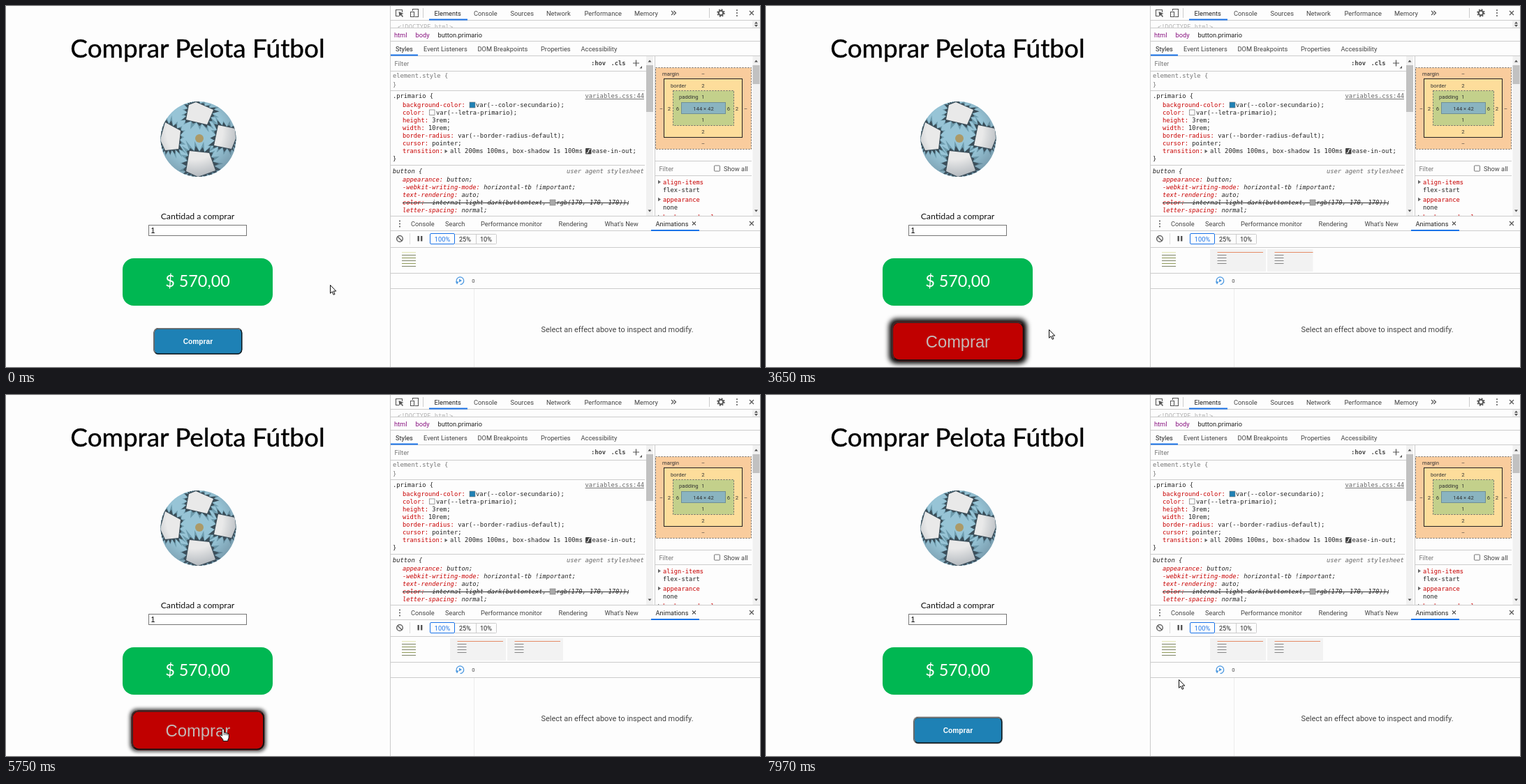
These frames come from a looping animation (1080 px wide and 518 px high, 8000 ms). An HTML page:

```html
<!DOCTYPE html>
<html lang="es">
<head>
<meta charset="utf-8">
<title>Comprar Pelota Fútbol</title>
<style>
html, body { margin: 0; width: 100%; height: 100%; overflow: hidden; background: #fdfdfd; }
svg { display: block; width: 1080px; height: 518px; }
text { white-space: pre; font: 9.25px Roboto, "Open Sans", sans-serif; fill: #444; }
.page { font-family: Lato, sans-serif; text-anchor: middle; stroke-linejoin: round; }
.code { font: 8.78px "DejaVu Sans Mono", monospace; fill: #222; }
.it { font-style: italic; }
.red { fill: #c80000; }
.box { font-size: 7.7px; fill: #333; }
.mid { text-anchor: middle; }
</style>
</head>
<body>
<svg viewBox="0 0 1080 518">
  <defs>
    <clipPath id="ballClip"><circle cx="275.5" cy="191" r="54"/></clipPath>
    <radialGradient id="shade" cx=".45" cy=".4" r=".62">
      <stop offset=".6" stop-color="#456" stop-opacity="0"/>
      <stop offset="1" stop-color="#456" stop-opacity=".35"/>
    </radialGradient>
    <clipPath id="domClip"><rect x="551" y="21" width="517" height="10"/></clipPath>
    <clipPath id="sideClip"><rect x="930" y="244" width="138" height="57"/></clipPath>
    <clipPath id="clip1"><rect id="wipe1" x="636" y="348" height="35"/></clipPath>
    <clipPath id="clip2"><rect id="wipe2" x="718" y="348" height="35"/></clipPath>
    <filter id="blur" filterUnits="userSpaceOnUse" x="-100" y="-60" width="200" height="120">
      <feGaussianBlur id="blurSize" stdDeviation="0"/>
    </filter>
  </defs>
  <g id="page"></g>
  <g id="tools"></g>
  <g id="thumbs"></g>
  <g id="button">
    <rect id="shadow" rx="7" filter="url(#blur)"/>
    <rect id="face" x="-63.5" y="-19" width="127" height="38" rx="7"/>
    <rect x="-62.8" y="-18.3" width="125.6" height="36.6" rx="6.3" fill="none" stroke="#141414" stroke-width="1.4"/>
    <path id="bevel" d="M-61 16.5Q-62.8 14.7 -62.8 12V-12Q-62.8 -18.3 -56.5 -18.3H56.5Q59.2 -18.3 61 -16.5" fill="none" stroke-width="1.4"/>
    <text id="label" class="mid">Comprar</text>
  </g>
  <path id="arrow" d="M.5 .5V12.3L3.2 9.8L5.1 14.3L7 13.5L5.1 9.1H8.8Z" fill="#fff" stroke="#111" stroke-width="1"/>
  <g id="hand">
    <path d="M-1.6 10.2V1.4Q-1.6 0 -.2 0T1.3 1.4V5.4Q3.1 4.6 3.9 6Q5.4 5.3 6.1 6.7Q8.2 6.3 8.2 8.6V12Q8.2 14 6.9 15.5V17.5H-.1V15.6L-4.2 10.4Q-5 8.6 -3.4 8.3Z" fill="#fff" stroke="#111" stroke-width="1" stroke-linejoin="round"/>
    <path d="M1.3 5.4V9M3.9 6V9.2M6.1 6.7V9.4" stroke="#111" stroke-width=".8"/>
  </g>
</svg>
<script>
const $ = id => document.getElementById(id);
const set = (el, attrs) => { for (const k in attrs) el.setAttribute(k, attrs[k]); };
const clamp = v => Math.min(1, Math.max(0, v));
const mix = (a, b, p) => a + (b - a) * p;
const rgb = (a, b, p) => `rgb(${a.map((v, i) => Math.round(mix(v, b[i], p)))})`;

const esc = s => s.replace(/</g, '&lt;');
const text = (x, y, s, cls = '', style = '') => `<text x="${x}" y="${y}" class="${cls}" style="${style}">${esc(s)}</text>`;
const rect = (x, y, w, h, fill, more = '') => `<rect x="${x}" y="${y}" width="${w}" height="${h}" fill="${fill}" ${more}/>`;
const path = (d, color, w = 1, more = '') => `<path d="${d}" fill="none" stroke="${color}" stroke-width="${w}" ${more}/>`;
const shape = (d, fill) => `<path d="${d}" fill="${fill}"/>`;
const hline = (x, y, x2, color = '#ccc') => path(`M${x} ${y}H${x2}`, color);

function ball() {
  let seed = 7;
  const rnd = () => (seed = seed * 16807 % 2147483647) / 2147483647;
  const patches = [
    [[262, 142], [272, 138], [297, 149], [288, 170], [258, 163]],
    [[304, 171], [328, 176], [329, 190], [323, 205], [298, 200]],
    [[228, 167], [250, 179], [247, 205], [228, 207], [221, 192]],
    [[263, 208], [291, 211], [300, 236], [275, 245], [258, 237]]
  ];
  const center = (p, k) => p.reduce((s, q) => s + q[k], 0) / 5;
  function spiky(p, reach, fill) {
    const cx = center(p, 0), cy = center(p, 1), pts = [];
    for (let i = 0; i < 40; i++) {
      const a = p[i / 8 | 0], b = p[((i / 8 | 0) + 1) % 5], u = i % 8 / 8;
      const k = 1.04 + (i % 2) * reach * (.4 + .6 * rnd());
      pts.push([cx + (mix(a[0], b[0], u) - cx) * k, cy + (mix(a[1], b[1], u) - cy) * k]);
    }
    return shape('M' + pts.join('L') + 'Z', fill);
  }
  const each = f => patches.map(f).join('');
  return `<g clip-path="url(#ballClip)">${rect(221, 136, 109, 110, '#97c4d6')}
    ${each(p => spiky(p, .85, '#6d9bad'))}${each(p => spiky(p, .45, '#3b4e59'))}
    ${each(p => shape(`M${p.join('L')}Z`, '#e9e9e9'))}
    <circle cx="277" cy="190" r="6" fill="#ab9a68"/>
    <circle cx="275.5" cy="191" r="54" fill="url(#shade)"/></g>`;
}

$('page').innerHTML =
  text(274.5, 74, 'Comprar Pelota Fútbol', 'page', 'font-size:36.9px;fill:#000;stroke:#000;stroke-width:.4') +
  ball() +
  text(274.5, 306, 'Cantidad a comprar', 'page', 'font-size:12.3px;fill:#111') +
  rect(204.5, 314.5, 140, 15, '#fff', 'stroke="#767676"') +
  text(207.5, 326, '1', '', 'font:10.67px Liberation Sans,sans-serif;fill:#000') +
  rect(167, 362, 215, 68, '#00b752', 'rx="16"') +
  text(274.5, 403, '$ 570,00', 'page', 'font-size:23.4px;fill:#fff');

function scrollbar(x, thumbY, thumbH) {
  return rect(x, 72, 10, 229, '#f1f1f1') + rect(x, thumbY, 10, thumbH, '#c1c1c1') +
    shape(`M${x + 2.5} 80.5h5l-2.5 -3z`, '#505050') + shape(`M${x + 2.5} 292.5h5l-2.5 3z`, '#505050');
}
const cross = (x, y) => path(`M${x - 3} ${y - 3}l6 6m0 -6l-6 6`, '#555', 1.2);
const dots = (x, y) => [-4, 0, 4].map(d => `<circle cx="${x}" cy="${y + d}" r="1" fill="#555"/>`).join('');
const fold = (x, y) => shape(`M${x} ${y - 2.7}v5.4l4 -2.7z`, '#666');
const row = (y, items) => items.map(([x, s, color]) => text(x, y, s, '', color ? 'fill:' + color : '')).join('');
const rule = (y, name, value, x, cls = '') => text(568, y, name + ':', 'code red ' + cls) + text(x || 568 + 5.28 * (name.length + 2), y, value, 'code ' + cls);

function topBars() {
  return rect(550, 0, 530, 518, '#fdfdfd') +
    hline(551, 20.5, 1080) + hline(551, 31.5, 1080) + hline(551, 50.5, 1080) + hline(551, 71.5, 1080) +
    path('M563 14.5h-4.5v-9h9v3.5', '#555', 1.1) + shape('M562.5 8l7 3l-3 1l2.5 3l-1.2 1l-2.4 -3l-1.9 2z', '#555') +
    path('M582.5 7V4.5h8v11h-5M579.5 8.5h5v7h-5z', '#555', 1.1) + path('M597.5 3V17M1007.5 3V17', '#ccc') +
    row(13.5, [[613.5, 'Elements', '#222'], [670, 'Console'], [722.5, 'Sources'], [774, 'Network'], [828.5, 'Performance'], [900, 'Memory']]) +
    path('M953 7l3 3l-3 3m3.5 -6l3 3l-3 3', '#555', 1.2) + rect(606, 18.5, 55, 2, '#1a73e8') +
    `<circle cx="1024" cy="10" r="3.2" fill="none" stroke="#555" stroke-width="2"/>
     <circle cx="1024" cy="10" r="4.9" fill="none" stroke="#555" stroke-width="1.6" stroke-dasharray="2 1.85"/>` +
    dots(1047, 10) + cross(1068, 10) +
    `<g clip-path="url(#domClip)">${text(561, 32.5, '<!DOCTYPE html>', 'code', 'fill:#b4b4b4')}</g>` +
    rect(1069, 21, 11, 10, '#f1f1f1') + shape('M1072 25.5h5l-2.5 -3zM1072 27h5l-2.5 3z', '#505050') +
    row(44.5, [[556, 'html', '#881280'], [586.5, 'body', '#881280'], [618.5, 'button.primario', '#222']]) +
    row(64.5, [[558, 'Styles', '#222'], [598, 'Event Listeners'], [675.5, 'DOM Breakpoints'], [766, 'Properties'], [823.5, 'Accessibility']]) +
    rect(551, 69.5, 39, 2, '#1a73e8');
}

function styles() {
  return text(556.5, 86, 'Filter', '', 'fill:#777') +
    text(838, 85, ':hov', 'code', 'font-weight:bold;fill:#444') + text(866.5, 85, '.cls', 'code', 'font-weight:bold;fill:#444') +
    path('M898 82h9m-4.5 -4.5v9', '#555', 1.2) + shape('M911 86v3.5h-3.5z', '#555') +
    hline(551, 93.5, 917) + hline(551, 121.5, 915) + hline(551, 228.5, 915) +
    text(554, 103, 'element.style {', 'code', 'fill:#777') + text(554, 116, '}', 'code', 'fill:#777') +
    text(554, 132, '.primario {', 'code') + text(829.5, 132, 'variables.css:44', 'code', 'fill:#666;text-decoration:underline') +
    rule(145, 'background-color', 'var(--color-secundario);', 673) + rect(664, 138, 8, 8, '#1f81b5', 'stroke="#777" stroke-width=".6"') +
    rule(156, 'color', 'var(--letra-primario);', 616) + rect(606.5, 149, 7.5, 7.5, '#fff', 'stroke="#777" stroke-width=".7"') +
    rule(167, 'height', '3rem;') + rule(178, 'width', '10rem;') +
    rule(189, 'border-radius', 'var(--border-radius-default);') + rule(200, 'cursor', 'pointer;') +
    rule(211, 'transition', 'all 200ms 100ms, box-shadow 1s 100ms', 636) + fold(628.5, 208.5) +
    rect(830, 204, 8.5, 8.5, '#444', 'rx="1"') + path('M831.5 211q3 -.5 3 -3t3 -3', '#fff', 1.1) + text(839.5, 211, 'ease-in-out;', 'code') +
    text(554, 222, '}', 'code') + text(554, 240, 'button {', 'code it') +
    text(803, 240, 'user agent stylesheet', 'code it', 'fill:#666') +
    rule(252, 'appearance', 'button;', 0, 'it') + rule(263, '-webkit-writing-mode', 'horizontal-tb !important;', 0, 'it') +
    rule(274, 'text-rendering', 'auto;', 0, 'it') +
    rule(285, 'color', '-internal-light-dark(buttontext, ', 0, 'it') + text(788.5, 285, 'rgb(170, 170, 170));', 'code it') +
    hline(568, 282.5, 892, '#333') + rect(779, 278, 8, 8, '#aaa', 'stroke="#777" stroke-width=".6"') +
    rule(296, 'letter-spacing', 'normal;', 0, 'it') + scrollbar(917, 85, 67);
}

function boxModel() {
  const dash = 'stroke="#666" stroke-dasharray="2 2"', solid = 'stroke="#222"';
  const num = (x, y, s) => text(x, y, s, 'box mid');
  return path('M929.5 72V301', '#ccc') +
    rect(930.5, 88.5, 137, 117, '#f9cc9d', dash) + rect(942.5, 104.5, 112, 84, '#fddd9b', solid) +
    rect(955.5, 121.5, 87, 50, '#c3d08b', dash) + rect(967.5, 138.5, 63, 16, '#8ab4c0', 'stroke="#6f8f96"') +
    text(940, 100, 'margin', 'box') + text(952, 116.5, 'border', 'box') + text(964, 133, 'padding', 'box') +
    num(998.5, 100, '–') + num(998.5, 116.5, '2') + num(998.5, 133, '1') + num(999, 149.5, '144 × 42') +
    num(998.5, 166, '1') + num(998.5, 183, '2') + num(998.5, 200, '–') +
    [[938.5, '–'], [950, '2'], [962, '6'], [1035, '6'], [1047, '2'], [1059.5, '–']].map(([x, s]) => num(x, 149.5, s)).join('') +
    hline(930, 222.5, 1068) + hline(930, 243.5, 1068) + text(935.5, 237, 'Filter', '', 'fill:#777') +
    rect(1014.5, 229, 8, 8, '#fff', 'stroke="#767676" rx="1"') + text(1028, 237, 'Show all') +
    `<g clip-path="url(#sideClip)">` +
    [['align-items', 'flex-start'], ['appearance', 'none'], ['background-color', '']].map(([k, v], i) =>
      fold(934, 252.5 + i * 25) + text(941, 256 + i * 25, k, 'code red') + text(941, 267 + i * 25, v, 'code')).join('') + '</g>' +
    scrollbar(1069.5, 85, 27);
}

function drawer() {
  return [301.5, 322.5, 346.5, 383.5, 405.5].map(y => hline(551, y, 1080)).join('') +
    dots(564, 312.5) +
    row(316, [[580, 'Console'], [629, 'Search'], [680, 'Performance monitor'], [791.5, 'Rendering'], [857.5, "What's New"], [930.5, 'Animations', '#222']]) +
    path('M983 309.5l5 5m0 -5l-5 5', '#555', 1.1) + cross(1068, 312) + rect(924, 321, 69, 2, '#1a73e8') +
    '<circle cx="564" cy="334" r="4.3" fill="none" stroke="#555" stroke-width="1.3"/>' + path('M561 331l6 6', '#555', 1.3) +
    rect(589.5, 330, 2.4, 7.5, '#555') + rect(594, 330, 2.4, 7.5, '#555') +
    path('M578.5 326V342', '#ddd') + rect(642.5, 327.5, 60, 14, '#fdfdfd', 'stroke="#ccc" rx="1"') + path('M673.5 327V342', '#ccc') +
    rect(607.5, 326.5, 35, 15, '#fdfdfd', 'stroke="#1a73e8" rx="1.5"') +
    text(625, 337.5, '100%', 'mid', 'fill:#1a73e8') + text(657.5, 337.5, '25%', 'mid', 'fill:#222') + text(687.5, 337.5, '10%', 'mid', 'fill:#222') +
    path('M646.2 397.5A5.3 5.3 0 1 1 650.5 399.6', '#4a97e0', 1.2) + shape('M649 391.5v5l4 -2.5zM644 395.5l4.5 0l-2.5 4z', '#4a97e0') +
    text(669.5, 396.5, '0', 'mid', 'font-size:7.7px') + path('M670.5 406V518', '#ececec') +
    text(875.5, 467.5, 'Select an effect above to inspect and modify.', 'mid', 'font-size:10.95px') +
    path('M550.5 0V518', '#cbcbcb');
}

$('tools').innerHTML = topBars() + styles() + boxModel() + drawer();

const bars = (x, w, ys, color) => ys.map(y => hline(x, y, x + w, color)).join('');
const shortRows = [357.5, 361.5, 365.5, 369.5];
const thumb = (n, x) => `<g clip-path="url(#clip${n})">${rect(x, 349, 80, 32, '#f2f2f2')}
  <g id="run${n}">${rect(x + 1, 350, 0, 30, '#bad6f6', `id="fill${n}"`)}<path id="edge${n}" stroke="#555"/></g>
  ${bars(x + 10.5, 65.5, [353.5], '#e58c66')}${bars(x + 10.5, 13, shortRows, '#858585')}</g>`;
$('thumbs').innerHTML = bars(567, 20, [353.5], '#e2e6b4') + bars(567, 20, [357.5, 365.5, 373.5], '#7d8468') +
  bars(567, 20, [361.5, 369.5], '#8f9a58') + thumb(1, 636) + thumb(2, 718);

function bezier(x1, y1, x2, y2) {
  const at = (a, b, u) => 3 * a * u * (1 - u) ** 2 + 3 * b * u * u * (1 - u) + u ** 3;
  return x => {
    let lo = 0, hi = 1;
    x = clamp(x);
    for (let i = 0; i < 24; i++) {
      const m = (lo + hi) / 2;
      if (at(x1, x2, m) < x) lo = m; else hi = m;
    }
    return at(y1, y2, hi);
  };
}
const ease = bezier(.25, .1, .25, 1), easeInOut = bezier(.42, 0, .58, 1);

// Screen refreshes: first time, last time, count
const bursts = [[790, 1560, 11], [1640, 1800, 3], [1950, 2410, 7], [3340, 4120, 11], [4200, 4200, 1], [4360, 4360, 1],
  [4810, 5580, 11], [5660, 5970, 5], [6810, 7580, 11], [7660, 7970, 5]];
function refresh(t) {
  let last = 0;
  for (const [a, b, n] of bursts) {
    if (t < a) break;
    const step = n > 1 ? (b - a) / (n - 1) : 1;
    last = Math.min(b, a + Math.floor((t - a) / step + .01) * step);
  }
  return last;
}

const hovers = [1480, 3470, 5040, 7232];   // enter, leave, enter, leave
function hover(t, duration, curve) {
  const n = hovers.filter(h => h <= t).length;
  if (!n) return 0;
  const p = curve((t - hovers[n - 1] - 100) / duration);
  return n % 2 ? p : 1 - p;
}

const track = [[0, 464, 400], [713, 464, 400], [1560, 324, 473], [3263, 324, 473], [3650, 414, 463], [4800, 414, 463],
  [5120, 316, 476], [5580, 311, 478.5], [6733, 311, 478.5], [6950, 318, 477], [7330, 415.5, 460], [7590, 418, 460], [7970, 591, 408], [8000, 591, 408]];
function pointer(t) {
  const i = Math.max(1, track.findIndex(k => k[0] >= t));
  const [a, b] = [track[i - 1], track[i]], u = clamp((t - a[0]) / (b[0] - a[0])), s = u * u * (3 - 2 * u);
  return [mix(a[1], b[1], s), mix(a[2], b[2], s)];
}

function drawButton(t) {
  const p = hover(t, 200, ease), glow = hover(t, 1000, easeInOut), tint = 1 - (1 - p) ** 1.8;
  const grow = 2.5 * glow, size = mix(10.2, 15.9, p);
  set($('button'), { transform: `translate(274.9 481) scale(${1 + p / 2})` });
  set($('shadow'), { x: -63.5 - grow, y: -19 - grow, width: 127 + 2 * grow, height: 38 + 2 * grow, opacity: glow });
  set($('blurSize'), { stdDeviation: 2.6 * glow });
  set($('face'), { fill: rgb([30, 129, 181], [192, 0, 0], tint) });
  set($('bevel'), { stroke: rgb([128, 124, 122], [66, 40, 40], p) });
  set($('label'), { y: size * .36, style: `font:${p < .35 ? 700 : 400} ${size}px Liberation Sans,sans-serif;fill:${rgb([255, 255, 255], [196, 184, 182], p)}` });
}

function drawThumb(n, x, born, replay, t) {
  set($('wipe' + n), { width: t < born ? 0 : 40 + 40 * ease((t - born) / 200) });
  const u = (t - replay) / 200, w = 79 * clamp(u / .9);
  set($('run' + n), { opacity: u < 0 ? 0 : clamp((1 - u) * 10) });
  set($('fill' + n), { width: w });
  set($('edge' + n), { d: `M${x + .5 + w} 350V380` });
}

function draw(time) {
  const t = refresh(time), [x, y] = pointer(t);
  const over = hovers.filter(h => h <= t).length % 2;
  drawButton(t);
  drawThumb(1, 636, 1528, 5020, t);
  drawThumb(2, 718, 3500, 7184, t);
  const move = `translate(${Math.round(x)} ${Math.round(y)})`;
  set($('arrow'), { transform: move, visibility: over ? 'hidden' : 'visible' });
  set($('hand'), { transform: move, visibility: over ? 'visible' : 'hidden' });
}

const start = performance.now();
function loop() {
  draw((performance.now() - start) % 8000);
  requestAnimationFrame(loop);
}
loop();
</script>
</body>
</html>
```
